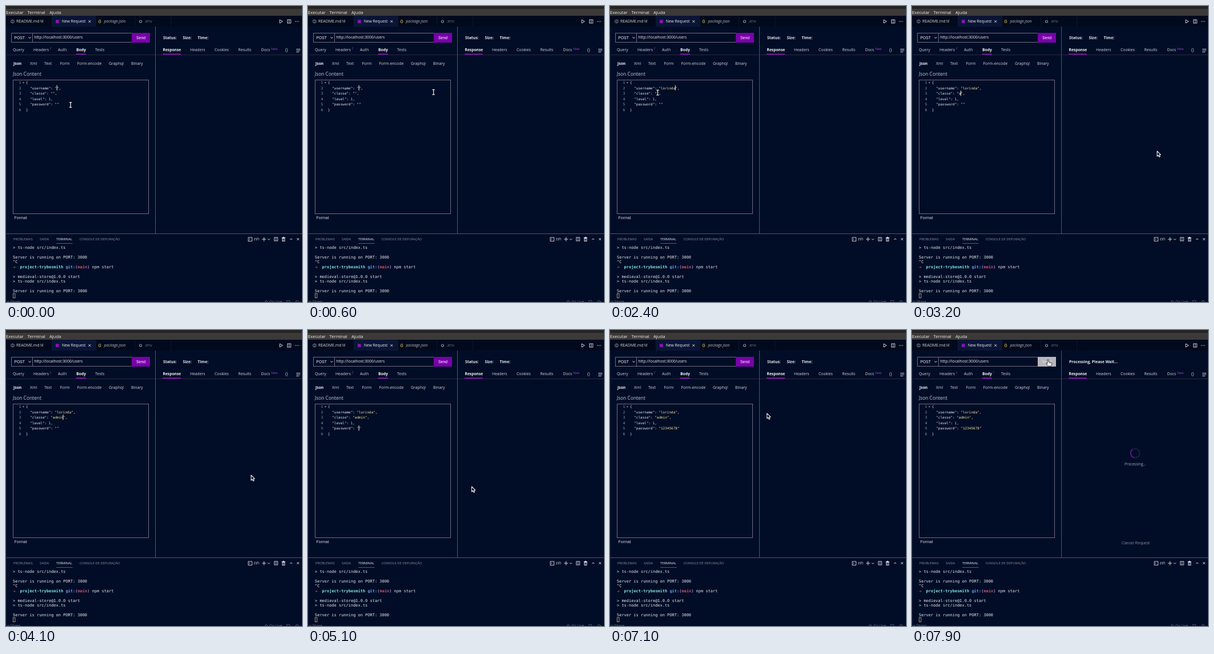
These frames come from a looping animation (518x518 px, 8000 ms). An HTML page with a canvas:

```html
<!DOCTYPE html>
<html lang="pt">
<head>
<meta charset="utf-8">
<title>API request</title>
<style>
html, body { margin: 0; width: 100%; height: 100%; overflow: hidden; background: #010d26; }
canvas { display: block; width: 100vw; height: 100vh; }
</style>
</head>
<body>
<canvas id="stage"></canvas>
<script>
const SIZE = 518, LOOP = 8000, SENT = 7800;
const canvas = document.getElementById('stage');
const ctx = canvas.getContext('2d');
const ratio = window.devicePixelRatio || 1;
canvas.width = canvas.height = Math.round(SIZE * ratio);

const UI = '"Open Sans", "Noto Sans", sans-serif';
const ARIAL = '"Liberation Sans", Arial, sans-serif';
const MONO = '"DejaVu Sans Mono", "Noto Sans Mono", monospace';
const BG = '#010d26', LINE = '#5f4a6e', FRAME = '#716a82';
const TEXT = '#d2d4de', BRIGHT = '#f4f4fa', DIM = '#8d92a2';
const PURPLE = '#7a00aa', VIOLET = '#b035dc';

// Key times per field; the clicks move the caret to another line.
const fields = [
  { line: 1, col: 15, text: 'lorinda', from: 0, keys: [900, 1000, 1200, 1300, 1400, 1500, 1800] },
  { line: 2, col: 13, text: 'admin', from: 2500, keys: [3200, 3300, 3500, 3600, 3800] },
  { line: 4, col: 15, text: '12345678', from: 4800, keys: [5300, 5500, 5700, 5800, 6000, 6100, 6300, 6400] }
];

// Pointer hot spot: time, x, y
const path = [
  [0, 113, 173], [100, 113, 173], [700, 228, 149], [1750, 228, 149],
  [2400, 83.5, 151.5], [2600, 83.5, 151.5], [3000, 429, 254], [4100, 429, 254],
  [4700, 90, 172], [4850, 90, 172], [5100, 286.5, 274], [6650, 286.5, 274],
  [6950, 292, 190], [7350, 238, 52], [LOOP, 238, 52]
];

function text(str, x, y, size, color = TEXT, font = UI, style = '') {
  ctx.font = `${style} ${size}px ${font}`;
  ctx.fillStyle = color;
  ctx.fillText(str, x, y + 2.3);
}
function rect(x, y, w, h, color) {
  ctx.fillStyle = color;
  ctx.fillRect(x, y, w, h);
}
function box(x, y, w, h, color, width = 1) {
  ctx.strokeStyle = color;
  ctx.lineWidth = width;
  ctx.strokeRect(x, y, w, h);
}
function poly(points, stroke, width = 1, fill, close) {
  ctx.beginPath();
  points.forEach(([x, y], i) => i ? ctx.lineTo(x, y) : ctx.moveTo(x, y));
  if (close) ctx.closePath();
  if (fill) { ctx.fillStyle = fill; ctx.fill(); }
  if (stroke) { ctx.strokeStyle = stroke; ctx.lineWidth = width; ctx.stroke(); }
}
function ring(x, y, r, color, width = 1, a = 0, b = Math.PI * 2) {
  ctx.beginPath();
  ctx.arc(x, y, r, a, b);
  ctx.strokeStyle = color;
  ctx.lineWidth = width;
  ctx.stroke();
}
function chevron(x, y, color = TEXT, dir = 1) {
  poly([[x - 2, y - dir], [x, y + dir], [x + 2, y - dir]], color, 1);
}
function cross(x, y, r, color) {
  poly([[x - r, y - r], [x + r, y + r]], color, 0.9);
  poly([[x - r, y + r], [x + r, y - r]], color, 0.9);
}
function split(x, y) {
  box(x - 3, y - 3, 6, 6, TEXT, 0.9);
  poly([[x, y - 3], [x, y + 3]], TEXT, 0.9);
}

function windowTop() {
  rect(0, 0, SIZE, 5, '#242423');
  rect(0, 5, SIZE, 12, '#3b3a39');
  text('Executar', 0, 11.3, 7.7, '#efeeec');
  text('Terminal', 37.5, 11.3, 7.7, '#efeeec');
  text('Ajuda', 76, 11.3, 7.7, '#efeeec');

  rect(0, 17, SIZE, 19, '#010a1d');
  rect(80, 17, 77, 19, '#0a1536');
  [80, 157, 225, 288].forEach(x => rect(x, 17, 0.6, 19, '#141c38'));
  ring(11.5, 27, 2.8, '#a6abbd', 0.8);
  rect(11.1, 26.6, 0.8, 2, '#a6abbd');
  rect(11.1, 25.2, 0.8, 0.8, '#a6abbd');
  text('README.md', 18, 27, 7, '#dad8ca');
  text('M', 60, 27, 6.2, '#c9c6b4');
  rect(87, 24.3, 5.5, 5.5, '#8a14b8');
  text('New Request', 97.7, 27, 6.8, '#eeeef4');
  cross(146.3, 27, 2, '#e0e1e8');
  text('{}', 161.5, 26.7, 6.5, '#d3b143', UI, 'bold');
  text('package.json', 171.5, 27, 6.7, '#b8b8b5', UI, 'italic');
  ring(235.5, 27, 2, '#858b9c', 1.2);
  text('.env', 242.5, 27, 6.7, '#70788c');
  poly([[479, 24], [484, 27], [479, 30]], TEXT, 1, null, true);
  split(495.5, 27);
  [506, 508.7, 511.4].forEach(x => rect(x, 26.5, 1.2, 1.2, TEXT));
}

function tabs(list, y, size) {
  list.forEach(([label, x, bold]) =>
    text(label, x, y, bold ? size - 0.1 : size, bold ? BRIGHT : TEXT, UI, bold ? 'bold' : ''));
}

function requestPane(t) {
  box(9.5, 47.5, 242, 16, FRAME);
  rect(46, 47.5, 1, 16, FRAME);
  text('POST', 14.5, 55.5, 6.8, BRIGHT, ARIAL);
  chevron(41.5, 55.5, BRIGHT);
  text('http://localhost:3000/users', 49.3, 54.8, 6.75, '#eeeff4');
  const sent = t >= SENT;
  rect(220, 47, 32, 17, sent ? '#b9b5bd' : PURPLE);
  text('Send', 228, 55.5, 6.9, sent ? '#dfdce2' : '#ffffff', ARIAL);

  tabs([['Query', 12], ['Headers', 48], ['Auth', 91], ['Body', 123, 1], ['Tests', 156]], 76.8, 6.9);
  text('2', 76.5, 74, 4.8, VIOLET);
  if (sent) text('1', 141.5, 74, 4.8, VIOLET);
  rect(2, 85, 260, 0.7, '#41304f');
  rect(122.5, 83.5, 17.5, 1.5, '#9012c4');

  tabs([['Json', 13, 1], ['Xml', 42], ['Text', 67], ['Form', 94.5], ['Form-encode', 124.5],
    ['Graphql', 180], ['Binary', 219]], 100.4, 6.9);
  text('Json Content', 12, 119.8, 8.4, '#c6c9d5');
  box(12.5, 129.5, 237, 234, FRAME);
  text('Format', 14.5, 370.3, 7, TEXT, ARIAL);
}

function editor(t) {
  const [user, role, pass] = fields.map(f => f.text.slice(0, f.keys.filter(k => k <= t).length));
  const X = 35, Y = 134, CELL = 3.6, STEP = 9.5;
  const rows = [
    [['{']],
    [['  "username"'], [': '], [`"${user}"`, 1], [',']],
    [['  "classe"'], [': '], [`"${role}"`, 1], [',']],
    [['  "level"'], [': '], ['1', 2], [',']],
    [['  "password"'], [': '], [`"${pass}"`, 1]],
    [['}']]
  ];
  const colors = ['#e9ebf4', '#f5e59b', '#c6dfbe'];
  rows.forEach((row, i) => {
    const y = Y + i * STEP;
    text(String(i + 1), 22.7, y - 0.2, 6, '#9aa0b1', MONO);
    let col = 0;
    row.forEach(([part, kind = 0]) => {
      text(part, X + col * CELL, y - 0.3, 6, colors[kind], MONO);
      col += part.length;
    });
  });
  poly([[28.8, 133.5], [32, 133.5], [30.4, 135.6]], null, 1, '#a8aebd', true);

  if (t >= SENT) return;
  const f = fields.filter(f => f.from <= t).pop();
  const typed = f.keys.filter(k => k <= t);
  const last = typed.length ? typed[typed.length - 1] : f.from;
  if ((t - last) % 1200 < 620)
    rect(X + (f.col + typed.length) * CELL - 0.4, Y + f.line * STEP - 4.8, 1, 9, '#f3f3f8');
}

function responsePane(t) {
  if (t < SENT) {
    [['Status:', 275], ['Size:', 309.5], ['Time:', 335.5]].forEach(([s, x]) =>
      text(s, x, 55.3, 6.8, '#e6e7ee', UI, 'bold'));
  } else {
    text('Processing, Please Wait...', 275, 55.3, 6.8, '#e6e7ee', UI, 'bold');
    ring(390.5, 215.5, 8, '#24204a', 1.7);
    const a = Math.PI * (0.55 + (t - SENT - 100) / 500);
    ring(390.5, 215.5, 8, '#6a1496', 1.7, a, a + Math.PI * 0.75);
    text('Processing...', 372, 234.5, 6.5, '#a3a7b6');
    text('Cancel Request', 367, 372.3, 6.9, '#7d8394', ARIAL);
  }
  tabs([['Response', 274.5, 1], ['Headers', 322], ['Cookies', 365], ['Results', 406.5],
    ['Docs', 446.5]], 76.8, 6.8);
  text('New', 464, 74.2, 5.4, VIOLET);
  text('{}', 488.5, 76.3, 6.8, TEXT);
  [75, 77.5, 80].forEach((y, i) => rect(508, y, i === 2 ? 5 : 7, 0.9, TEXT));
  rect(262, 85, 256, 0.7, '#41304f');
  rect(274, 83.5, 32, 1.5, '#9012c4');
}

function terminal() {
  rect(261, 36, 1, 362, LINE);
  rect(0, 398, SIZE, 1, LINE);
  rect(0.5, 36, 0.7, 482, '#141a36');
  text('PROBLEMAS', 13, 407.8, 5.8, DIM);
  text('SAÍDA', 59, 407.8, 5.8, DIM);
  text('TERMINAL', 88, 407.8, 5.8, BRIGHT);
  text('CONSOLE DE DEPURAÇÃO', 128.5, 407.8, 5.8, DIM);
  rect(88, 415, 28.5, 0.8, '#8a5a9a');

  box(424, 405, 6.5, 6.5, TEXT, 0.9);
  poly([[425.5, 406.7], [427, 408.2], [425.5, 409.7]], TEXT, 0.8);
  text('zsh', 433.5, 407.8, 6.2, TEXT);
  rect(448, 407.6, 7, 1, TEXT);
  rect(451, 404.6, 1, 7, TEXT);
  chevron(460, 408.3);
  split(472.5, 408);
  rect(482.5, 405, 6.4, 1, TEXT);
  box(483.6, 406.5, 4.2, 5, TEXT, 1);
  rect(485.3, 407, 0.8, 4, TEXT);
  rect(484.4, 404, 2.6, 1, TEXT);
  chevron(499, 408, TEXT, -1);
  cross(511, 408, 2, TEXT);

  const X = 12, CELL = 4.2;
  const say = (s, col, y, color = '#e4e6ec', style = '') =>
    text(s, X + col * CELL, y, 6.98, color, MONO, style);
  const running = 'Server is running on PORT: 3000';
  say('> ts-node src/index.ts', 0, 422.7);
  say(running, 0, 439.5);
  say('^C', 0, 448);
  text('➜', X, 456.3, 5.8, '#e04050', '"DejaVu Sans", sans-serif');
  say('project-trybesmith', 3, 456.3, '#80e2df', 'bold');
  say('git:(', 22, 456.3, '#7597e8', 'bold');
  say('main', 27, 456.3, '#e54857', 'bold');
  say(')', 31, 456.3, '#7597e8', 'bold');
  say('npm start', 33, 456.3);
  say('> medieval-store@1.0.0 start', 0, 473.4);
  say('> ts-node src/index.ts', 0, 481.8);
  say(running, 0, 498.5);
  box(12.5, 503.2, 3.4, 7.6, '#d0b48a', 0.8);

  text('n Share', 2, 518, 6.5, '#6d7388');
  ring(455.5, 518, 2.2, '#6d7388', 0.8);
  text('Go Live', 461, 518, 6.5, '#6d7388');
  box(491.5, 515.5, 5, 5, '#555b72', 0.8);
  ring(509.5, 518, 2.5, '#6d7388', 0.8);
}

function pointerAt(t) {
  const i = Math.max(1, path.findIndex(p => p[0] > t));
  const [t0, x0, y0] = path[i - 1], [t1, x1, y1] = path[i];
  const u = (t - t0) / (t1 - t0), e = u * u * (3 - 2 * u);
  return [x0 + (x1 - x0) * e, y0 + (y1 - y0) * e];
}

function pointer(t) {
  const [x, y] = pointerAt(t);
  const overSend = x > 220 && x < 252 && y > 47 && y < 64;
  const overCode = x > 12 && x < 249 && y > 129 && y < 363;
  ctx.save();
  ctx.translate(x, y);
  ctx.lineJoin = 'round';
  if (overSend) {
    poly([[-1, 0], [1, 0], [1, 4], [6, 5], [7, 6], [6.5, 9], [5.5, 11], [0.5, 11],
      [-3.5, 6.5], [-3, 5.5], [-1, 7]], '#22202b', 0.8, '#f7f7fa', true);
    [2.3, 4.2].forEach(px => rect(px, 5, 0.5, 2.3, '#55535e'));
  } else if (overCode) {
    [['#10131f', 2.4], ['#f1f1f4', 1.2]].forEach(([color, width]) => {
      poly([[-2.2, -4.3], [2.2, -4.3]], color, width);
      poly([[0, -4.3], [0, 4.3]], color, width);
      poly([[-2.2, 4.3], [2.2, 4.3]], color, width);
    });
  } else {
    poly([[0, 0], [0, 9], [2, 7.2], [3.5, 10.3], [5.1, 9.6], [3.7, 6.6], [6.3, 6.3]],
      '#f0f0f4', 1.1, '#0a0c14', true);
  }
  ctx.restore();
}

function draw(t) {
  ctx.setTransform(canvas.width / SIZE, 0, 0, canvas.height / SIZE, 0, 0);
  rect(0, 0, SIZE, SIZE, BG);
  windowTop();
  requestPane(t);
  editor(t);
  responsePane(t);
  terminal();
  pointer(t);
}

const start = performance.now();
function tick() {
  draw((performance.now() - start) % LOOP);
  requestAnimationFrame(tick);
}
tick();
</script>
</body>
</html>
```
